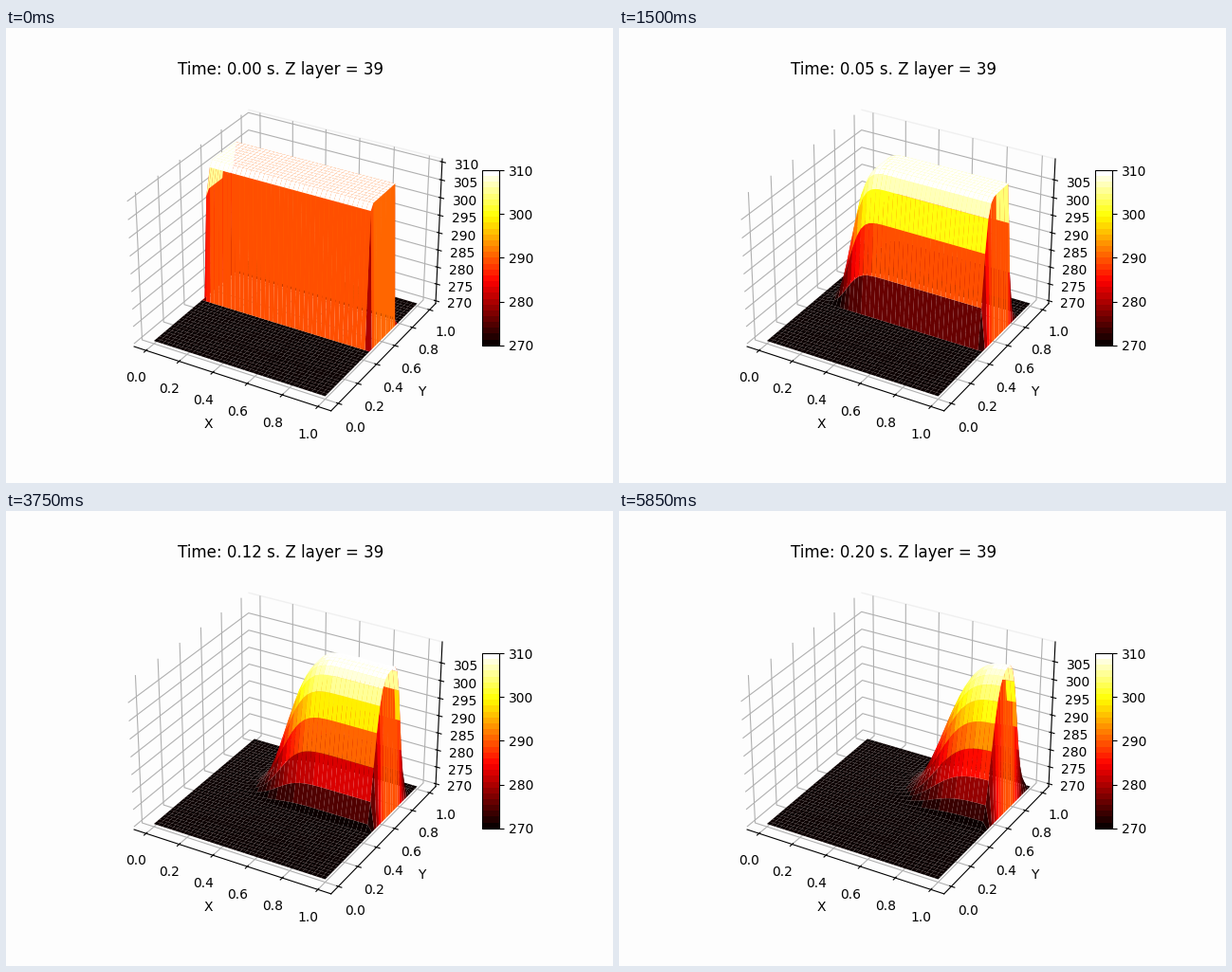
A matplotlib script that plays this animation: 640 px wide and 480 px high, repeating every 6000 ms.

```python
import numpy as np
import matplotlib.pyplot as plt
from matplotlib.animation import FuncAnimation

N = 40                     # grid nodes per side
COLD, HOT = 270.0, 310.0
CX, CY = 0.21, 0.0395      # Courant numbers along x and y
FRAMES, STEPS_PER_FRAME = 40, 3
PAPER = "#fdfdfd"


def simulate(steps):
    """First-order upwind advection of a hot block between cold walls."""
    temp = np.full((N, N), COLD)
    temp[1:-1, 19:30] = HOT
    history = [temp]
    for _ in range(steps):
        new = temp.copy()
        core = temp[1:-1, 1:-1]
        new[1:-1, 1:-1] = (core - CX * (core - temp[:-2, 1:-1])
                           - CY * (core - temp[1:-1, :-2]))
        temp = new
        history.append(temp)
    return history


def padded(low, high, share):
    pad = (high - low) * share
    return low - pad, high + pad


history = simulate(STEPS_PER_FRAME * FRAMES)
axis_nodes = np.linspace(0, 1, N)
X, Y = np.meshgrid(axis_nodes, axis_nodes, indexing="ij")
SIDE_LIMITS = padded(*padded(0, 1, 0.05), 1 / 48)

fig = plt.figure(figsize=(6.4, 4.8), dpi=100, facecolor=PAPER)
ax = fig.add_subplot(111, projection="3d", facecolor=PAPER)
for axis in (ax.xaxis, ax.yaxis, ax.zaxis):
    axis.set_pane_color(PAPER)
ax.yaxis.pane.set_edgecolor("#f0f0f0")
ax.set_xlabel("X")
ax.set_ylabel("Y")

cmap = plt.get_cmap("hot", 30)
norm = plt.Normalize(COLD, HOT)
fig.colorbar(plt.cm.ScalarMappable(norm, cmap), ax=ax, shrink=0.5, aspect=10,
             ticks=np.arange(270, 311, 10))


def draw(frame):
    for old in list(ax.collections):
        old.remove()
    temp = history[STEPS_PER_FRAME * frame + 1]
    top = temp.max()
    ax.plot_surface(X, Y, temp, cmap=cmap, vmin=COLD, vmax=HOT, linewidth=0)
    ax.set_xlim(*SIDE_LIMITS)
    ax.set_ylim(*SIDE_LIMITS)
    ax.set_zlim(*padded(COLD, top, 1 / 48))
    ax.set_xticks(np.linspace(0, 1, 6))
    ax.set_yticks(np.linspace(0, 1, 6))
    ax.set_zticks(np.arange(COLD, top + 1e-9, 5))
    # the trailing space nudges the centred title to the left
    ax.set_title(f"Time: {frame / 200:.2f} s. Z layer = 39 ")
    return []


anim = FuncAnimation(fig, draw, frames=FRAMES, interval=150, repeat=True,
                     repeat_delay=0, blit=False)
plt.show()
```
